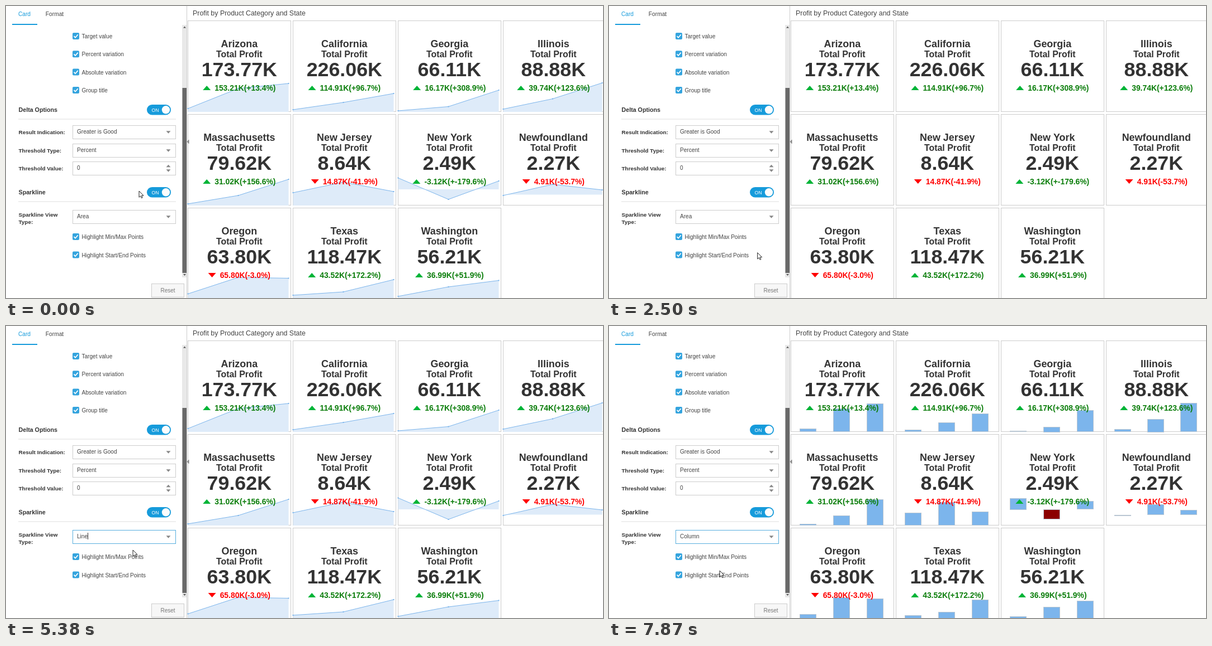
An HTML page with a canvas for the animation above (8250 ms loop, 1068 by 524 pixels).

```html
<!DOCTYPE html>
<html lang="en">
<head>
<meta charset="utf-8">
<title>Sparkline card options</title>
<style>
  html, body { margin: 0; width: 100%; height: 100%; overflow: hidden; background: #fff; }
  canvas { display: block; }
</style>
</head>
<body>
<canvas id="stage" width="1068" height="524"></canvas>
<script>
const ctx = document.getElementById('stage').getContext('2d');
const LOOP = 8250;
const BLUE = '#169bdb', GRAY = '#ccc', INK = '#333', SERIES = '#7cb5ec';
const SCROLL = 112;          // how far the panel drops when the sparkline options are hidden
const OPTIONS = ['Line', 'Area', 'Column'];
const ROW = 24.5, LIST_TOP = 390;

// points: heights of the three samples; zero: axis height; line: samples on the line chart's own scale
const CARDS = [
  { name: 'Arizona', value: '173.77K', delta: '153.21K(+13.4%)', points: [184, 148, 139] },
  { name: 'California', value: '226.06K', delta: '114.91K(+96.7%)', points: [186, 173, 157] },
  { name: 'Georgia', value: '66.11K', delta: '16.17K(+308.9%)', points: [188, 180.5, 151] },
  { name: 'Illinois', value: '88.88K', delta: '39.74K(+123.6%)', points: [185, 166.5, 138] },
  { name: 'Massachusetts', value: '79.62K', delta: '31.02K(+156.6%)', points: [187, 172, 143] },
  { name: 'New Jersey', value: '8.64K', delta: '14.87K(-41.9%)', down: true, points: [167, 148, 165], line: [179, 151.5, 176] },
  { name: 'New York', value: '2.49K', delta: '-3.12K(+-179.6%)', points: [140.5, 179, 146], zero: 161 },
  { name: 'Newfoundland', value: '2.27K', delta: '4.91K(-53.7%)', down: true, points: [172, 152, 162], zero: 170.5 },
  { name: 'Oregon', value: '63.80K', delta: '65.80K(-3.0%)', down: true, points: [180.5, 151, 152.5] },
  { name: 'Texas', value: '118.47K', delta: '43.52K(+172.2%)', points: [183, 177, 155] },
  { name: 'Washington', value: '56.21K', delta: '36.99K(+51.9%)', points: [185, 168, 156.5] },
];

// time, x, y of the pointer tip
const POINTER = [
  [80, 238, 332], [390, 282, 332], [1170, 282, 332], [1660, 269, 440], [1810, 269, 440],
  [1960, 276, 438], [2120, 277, 438], [2350, 277, 438], [2740, 243, 452], [3600, 243, 452],
  [4290, 286, 382], [4360, 288, 382], [4750, 288, 382], [4980, 227, 402], [5610, 227, 402],
  [6370, 288, 382], [6530, 288, 382], [7010, 199, 438.5], [7090, 198, 441], [7240, 198, 441],
  [7320, 198, 439],
];

const clamp = v => Math.max(0, Math.min(1, v));
const ease = v => v * v * (3 - 2 * v);
const within = (t, from, to) => t >= from && t < to;

function pointerAt(t) {
  const next = POINTER.findIndex(key => key[0] > t);
  if (next === 0) return POINTER[0].slice(1);
  if (next < 0) return POINTER[POINTER.length - 1].slice(1);
  const [t0, x0, y0] = POINTER[next - 1], [t1, x1, y1] = POINTER[next];
  const k = ease((t - t0) / (t1 - t0));
  return [x0 + (x1 - x0) * k, y0 + (y1 - y0) * k];
}

function rect(x, y, w, h, fill, stroke) {
  if (fill) { ctx.fillStyle = fill; ctx.fillRect(x, y, w, h); }
  if (stroke) { ctx.strokeStyle = stroke; ctx.lineWidth = 1; ctx.strokeRect(x + .5, y + .5, w - 1, h - 1); }
}

function pill(x, y, w, h, r, fill) {
  ctx.beginPath();
  ctx.roundRect(x, y, w, h, r);
  ctx.fillStyle = fill;
  ctx.fill();
}

function poly(points, fill) {
  ctx.beginPath();
  points.forEach(p => ctx.lineTo(...p));
  ctx.closePath();
  ctx.fillStyle = fill;
  ctx.fill();
}

function triangle(cx, cy, w, h, fill) {   // negative h points down
  poly([[cx - w / 2, cy + h / 2], [cx, cy - h / 2], [cx + w / 2, cy + h / 2]], fill);
}

// y is the middle of the capital letters
function text(s, x, y, size = 10.05, color = '#444', { bold = false, align = 'left' } = {}) {
  ctx.font = `${bold ? 'bold ' : ''}${size}px "Liberation Sans", Arial, sans-serif`;
  ctx.textAlign = align;
  ctx.fillStyle = color;
  ctx.fillText(s, x, y + size * .35);
}

function heading(s, y) {
  text(s, 22.5, y, 10.7, INK, { bold: true });
  rect(22, y + 16, 282, 1, '#ddd');
}

const label = (s, y) => text(s, 22.5, y, 9.95, INK, { bold: true });

function checkbox(s, y) {
  pill(119, y - 6, 12, 12, 2, '#34a4de');
  ctx.beginPath();
  ctx.moveTo(121.5, y);
  ctx.lineTo(124, y + 2.7);
  ctx.lineTo(128.7, y - 2.7);
  ctx.strokeStyle = '#fff';
  ctx.lineWidth = 1.7;
  ctx.stroke();
  text(s, 135.5, y + .5);
}

function field(value, y, focused) {
  rect(119, y - 12, 185, 25, '#fff', focused ? '#58aede' : GRAY);
  text(value, 127, y - 1);
}

function select(value, y, focused) {
  field(value, y, focused);
  triangle(290.5, y + .5, 8, -4.5, '#888');
}

function toggle(y, on) {
  pill(252, y - 9.5, 43, 18.5, 9.25, on > .5 ? BLUE : '#e0e0e0');
  if (on > .5) text('ON', 267, y, 8.6, '#fff', { align: 'center' });
  else text('OFF', 279, y, 8.6, '#888', { align: 'center' });
  ctx.beginPath();
  ctx.arc(262 + 24 * on, y - .2, 7.2, 0, 7);
  ctx.fillStyle = '#fcfcfc';
  ctx.fill();
}

function drawPanel(s) {
  ctx.save();
  ctx.beginPath();
  ctx.rect(0, 34, 315, 453);
  ctx.clip();
  ctx.translate(0, s.expanded ? 0 : SCROLL);

  rect(158, -94, 94, 21, '#fff', GRAY);
  rect(209, -94, 1, 21, GRAY);
  rect(119, -94, 39, 21, '#1278b3');
  heading('Layout', -50.5);
  label('Template:', -10);
  select('Compact', -11);
  ['Actual value label', 'Target value', 'Percent variation', 'Absolute variation', 'Group title']
    .forEach((name, i) => checkbox(name, 21.7 + 32.3 * i));

  heading('Delta Options', 186.5);
  toggle(186.5, 1);
  label('Result Indication:', 227);
  select('Greater is Good', 226);
  label('Threshold Type:', 259.5);
  select('Percent', 259);
  label('Threshold Value:', 291.5);
  field('0', 291);
  triangle(290.5, 287, 8, 4.5, '#888');
  triangle(290.5, 295.5, 8, -4.5, '#888');

  heading('Sparkline', 334.5);
  toggle(334.5, s.sparkOn);
  if (s.expanded) {
    label('Sparkline View', 374.5);
    label('Type:', 387.5);
    select(s.choice, 378, s.focused);
    if (s.caret) rect(s.choice === 'Line' ? 146 : 161, 371, 1, 12, '#333');
    checkbox('Highlight Min/Max Points', 414);
    checkbox('Highlight Start/End Points', 446.5);
  }
  ctx.restore();

  text('Card', 33, 14, 10.2, BLUE, { align: 'center' });
  text('Format', 87, 14.5, 10.2, '#444', { align: 'center' });
  rect(11, 32, 45, 2, BLUE);

  rect(315, 34, 8, 453, '#e9e9e9');
  const thumbTop = s.expanded ? 147 : 69;
  rect(315.5, thumbTop, 7.5, 479 - thumbTop, '#696969');
  triangle(319.5, 38, 5, 3, '#555');
  triangle(319.5, 482.5, 5, -3, '#555');
  rect(260, 498, 59, 25, '#f7f7f7', GRAY);
  text('Reset', 289.5, 510.5, 10, '#777', { align: 'center' });
}

function drawList(s, pointerY) {
  rect(119, LIST_TOP, 185, 74, '#fff', GRAY);
  const hovered = Math.floor((pointerY - LIST_TOP) / ROW);
  OPTIONS.forEach((name, i) => {
    const top = LIST_TOP + ROW * i;
    const fill = name === s.choice ? BLUE : i === hovered ? '#43aee4' : null;
    if (fill) rect(119, top, 184.5, ROW, fill);
    text(name, 128, top + 12.3, 10.05, fill ? '#fff' : '#444');
  });
}

function drawSparkline(card, left, width, chart) {
  const { points, zero = 190 } = card;
  if (chart === 'column') {
    const slot = width / 3;
    points.forEach((y, i) => {
      const x = Math.round(left + slot * (i + .25)), top = Math.round(Math.min(y, zero));
      const height = Math.max(1, Math.round(Math.abs(zero - y)));
      rect(x, top, Math.round(slot / 2), height, y > zero && y - zero > 5 ? '#8b0000' : SERIES, '#b9c6d2');
    });
    return;
  }
  const samples = chart === 'line' && card.line || points;
  const curve = samples.map((y, i) => [left + width / 2 * i, y]);
  if (chart === 'area') {
    poly([[left, zero], ...curve, [left + width, zero]], '#deebf9');
  }
  ctx.beginPath();
  curve.forEach(p => ctx.lineTo(...p));
  ctx.strokeStyle = SERIES;
  ctx.lineWidth = 1;
  ctx.stroke();
  curve.forEach(([x, y]) => rect(x - 1, y - 1, 2, 2, SERIES));
}

function drawCard(card, index, chart) {
  const column = index % 4, left = 325 + 188 * column;
  const narrow = column === 3 ? 4 : 0;
  const center = left + 92.3 - narrow / 2;
  const style = { bold: true, align: 'center' };
  ctx.save();
  ctx.translate(0, 168 * Math.floor(index / 4));
  rect(left, 26, 185 - narrow, 164, '#fff', GRAY);
  if (chart) drawSparkline(card, left + .5, column === 3 ? 177 : 180, chart);
  text(card.name, center, 67.8, 17.9, INK, style);
  text('Total Profit', center, 86.7, 15.9, INK, style);
  text(card.value, center, 113.8, 35.8, INK, style);

  ctx.font = 'bold 13.9px "Liberation Sans", Arial, sans-serif';
  const start = center - (ctx.measureText(card.delta).width + 21) / 2;
  triangle(start + 7, 147, 14, card.down ? -8 : 8, card.down ? '#f00' : '#00b437');
  text(card.delta, start + 21, 147.3, 13.9, card.down ? '#f00' : '#0a7d0a', { bold: true });
  ctx.restore();
}

const ARROW = new Path2D('M0 0V11.3L2.7 8.9L4.4 12.7L6.2 11.9L4.5 8.2H8Z');
const HAND = new Path2D('M-1.2 1Q0 -.6 1.2 1V5Q2.6 4.2 3.4 5.4Q4.8 4.8 5.4 6Q7 5.6 7.2 7V10' +
  'Q7 12 5.8 13V15H-1V13.4L-4 9.2Q-4.3 7.4 -2.6 8L-1.2 9.4Z');

function drawPointer(x, y, hand) {
  const shape = hand ? HAND : ARROW;
  ctx.save();
  ctx.translate(x, y);
  ctx.fillStyle = '#fff';
  ctx.fill(shape);
  ctx.strokeStyle = '#222';
  ctx.lineWidth = 1;
  ctx.stroke(shape);
  ctx.restore();
}

function stateAt(t) {
  return {
    sparkOn: t < 1600 ? 1 - clamp((t - 860) / 150) : clamp((t - 2280) / 150),
    expanded: !within(t, 1010, 2430),
    chart: t < 1170 ? 'area' : t < 2590 ? null : t < 5610 ? 'area' : t < 7630 ? 'line' : 'column',
    choice: t < 5300 ? 'Area' : t < 7300 ? 'Line' : 'Column',
    focused: t >= 4440,
    listOpen: within(t, 4520, 5300) || within(t, 6530, 7300),
    caret: within(t, 5380, 5890) || within(t, 6370, 6530) || within(t, 7320, 7870),
  };
}

function draw(t) {
  const s = stateAt(t);
  const [x, y] = pointerAt(t);
  rect(0, 0, 1068, 524, '#fff');
  drawPanel(s);
  rect(323, 0, 1, 524, GRAY);
  text('Profit by Product Category and State', 334, 12.5, 12.4, '#444');
  CARDS.forEach((card, i) => drawCard(card, i, s.chart));
  poly([[323.5, 243.5], [327.5, 239.5], [327.5, 247.5]], '#888');
  if (s.listOpen) drawList(s, y);

  const toggleY = s.expanded ? 334.5 : 446.5;
  const onToggle = x > 252 && x < 296 && Math.abs(y - toggleY) < 11;
  const onTrigger = x > 278 && (s.expanded ? within(y, 366, 391) : within(y, 326, 351));
  drawPointer(x, y, s.listOpen || onToggle || onTrigger);
}

const begin = performance.now();
function tick() {
  draw((performance.now() - begin) % LOOP);
  requestAnimationFrame(tick);
}
tick();
</script>
</body>
</html>
```
